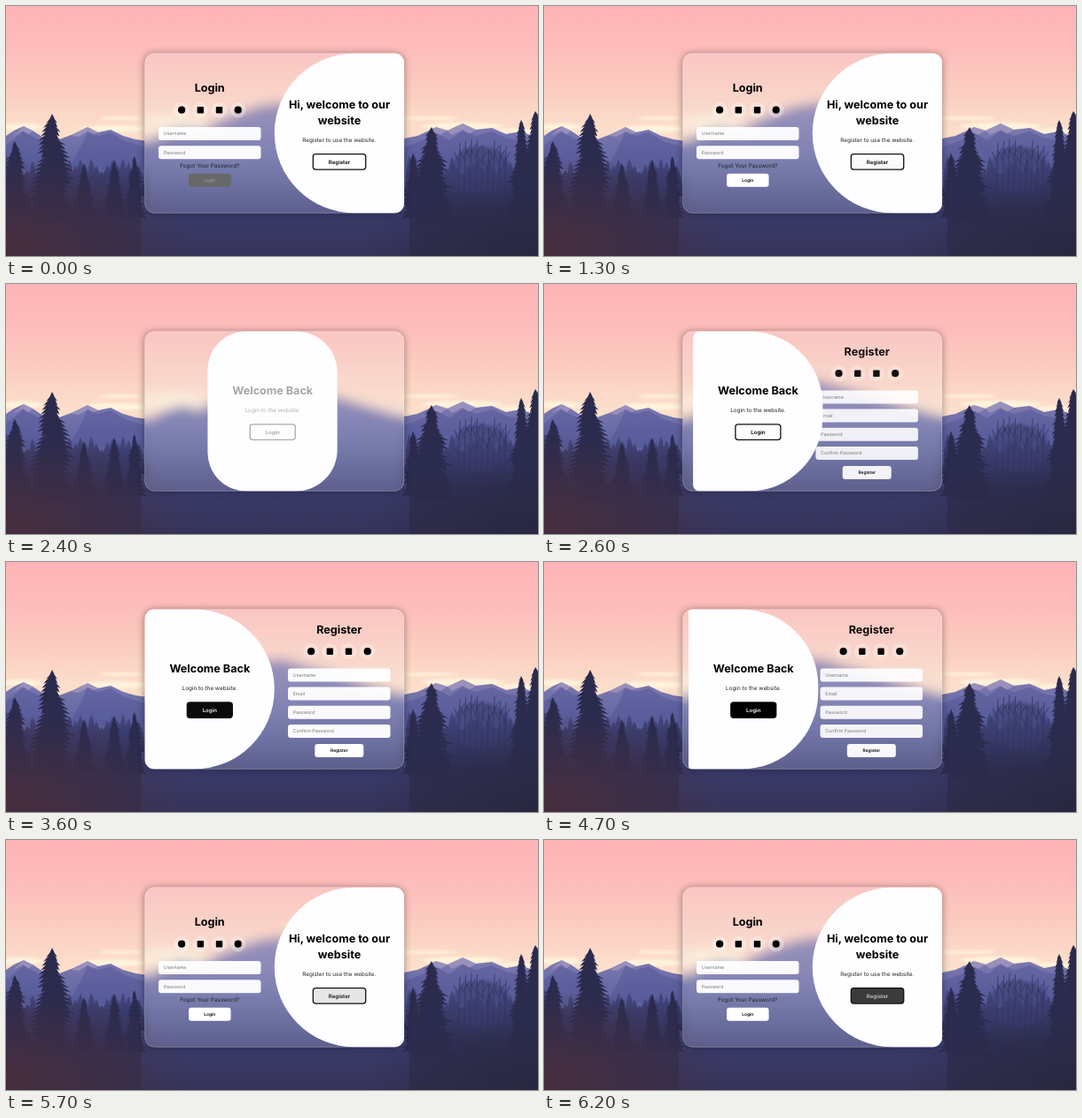
An HTML page for the animation above (6300 ms loop, 600 by 283 pixels).

```html
<!DOCTYPE html>
<html lang="en">
<head>
<meta charset="utf-8">
<style>
html, body { margin: 0; width: 100%; height: 100%; overflow: hidden; }
svg { display: block; width: 600px; height: 283px; font-family: Inter, sans-serif; text-rendering: geometricPrecision; }
text { text-anchor: middle; fill: #000; }
.title { font-size: 12.6px; font-weight: 700; }
.body { font-size: 6.35px; fill: #222; }
.hint { font-size: 5.3px; fill: #777; text-anchor: start; }
.label { font-size: 6.1px; font-weight: 600; }
.small { font-size: 4.9px; }
</style>
</head>
<body>
<svg viewBox="0 0 600 283">
  <defs>
    <linearGradient id="sky" x2="0" y2="1">
      <stop stop-color="#ffb3b7"/><stop offset=".18" stop-color="#fdbdba"/>
      <stop offset=".36" stop-color="#fbcfc1"/><stop offset=".5" stop-color="#fcdfcb"/>
    </linearGradient>
    <linearGradient id="land" gradientUnits="userSpaceOnUse" x1="0" y1="105" x2="0" y2="283">
      <stop stop-color="#8d80ad"/><stop offset=".22" stop-color="#7775ae"/>
      <stop offset=".42" stop-color="#6066a0"/><stop offset=".7" stop-color="#43467e"/>
      <stop offset=".77" stop-color="#383a68"/><stop offset="1" stop-color="#36335a"/>
    </linearGradient>
    <linearGradient id="forest" gradientUnits="userSpaceOnUse" x1="0" y1="160" x2="0" y2="283">
      <stop stop-color="#4b4e88"/><stop offset=".3" stop-color="#393b6b"/>
      <stop offset=".6" stop-color="#303056"/><stop offset="1" stop-color="#322e4e"/>
    </linearGradient>
    <linearGradient id="pine" gradientUnits="userSpaceOnUse" x1="0" y1="120" x2="0" y2="270">
      <stop stop-color="#2a2a4c"/><stop offset=".7" stop-color="#2c2c50"/><stop offset="1" stop-color="#302d4f"/>
    </linearGradient>
    <radialGradient id="ember">
      <stop stop-color="#4a2e3c" stop-opacity=".9"/><stop offset="1" stop-color="#4a2e3c" stop-opacity="0"/>
    </radialGradient>
    <radialGradient id="dusk">
      <stop stop-color="#26263e" stop-opacity=".85"/><stop offset="1" stop-color="#26263e" stop-opacity="0"/>
    </radialGradient>
    <filter id="soft" x="-50%" y="-150%" width="200%" height="400%"><feGaussianBlur stdDeviation="1.5"/></filter>
    <filter id="shade" x="-20%" y="-20%" width="140%" height="140%"><feGaussianBlur stdDeviation="4.5"/></filter>
    <filter id="frost" filterUnits="userSpaceOnUse" x="0" y="0" width="600" height="283"><feGaussianBlur stdDeviation="6.5"/></filter>
    <clipPath id="cardClip"><rect x="156.5" y="53.5" width="292.5" height="181" rx="11"/></clipPath>
    <clipPath id="panelClip"><path class="panel"/></clipPath>
  </defs>

  <g id="scene">
    <rect width="600" height="283" fill="url(#sky)"/>
    <g fill="#fff3dc" filter="url(#soft)">
      <ellipse cx="18" cy="137" rx="24" ry="4"/><ellipse cx="130" cy="127" rx="24" ry="1.8"/>
      <ellipse cx="122" cy="139" rx="36" ry="4"/><ellipse cx="190" cy="132" rx="34" ry="7"/>
      <ellipse cx="478" cy="127" rx="32" ry="1.8"/><ellipse cx="515" cy="136" rx="46" ry="4"/>
      <ellipse cx="580" cy="141" rx="26" ry="3"/>
    </g>
    <path fill="url(#land)" d="M0 147L9 141 20 136 30 141 42 149 60 151 76 145 92 137 104 143 118 140 132 147 146 151 160 153 185 141 200 137 218 143 240 130 262 121 285 113 310 109 340 118 375 128 410 139 449 150 464 147 475 142 485 137 498 141 515 133 530 140 548 138 564 145 580 142 600 149V283H0Z"/>
    <path fill="#c9b6cc" opacity=".4" d="M92 137L104 143 98 146 92 142 82 148 74 147ZM20 136L30 141 25 146 19 141 8 147ZM515 133L530 140 522 145 515 140 503 146 498 141ZM485 137L498 141 490 146 483 143 474 147Z"/>
    <path fill="#4f5092" opacity=".45" d="M92 142L104 147 118 143 134 153 157 160V185H70L84 160ZM20 142L34 150 48 155V185H0V158ZM515 141L530 147 548 142 566 150 600 154V185H449V160L470 152 486 144 500 152Z"/>
    <g id="trees"></g>
    <ellipse cx="0" cy="270" rx="210" ry="100" fill="url(#ember)"/>
    <ellipse cx="600" cy="275" rx="200" ry="85" fill="url(#dusk)"/>
  </g>

  <rect x="156" y="54" width="293" height="182" rx="11" opacity=".4" filter="url(#shade)"/>
  <g clip-path="url(#cardClip)">
    <use href="#scene" filter="url(#frost)"/>
    <rect x="156" y="53" width="294" height="183" fill="#eee" opacity=".17"/>
    <g id="register"></g>
    <g id="login"></g>
    <path class="panel" fill="#fefdff"/>
    <g clip-path="url(#panelClip)">
      <g id="welcome"></g>
      <g id="back"></g>
    </g>
  </g>
  <rect x="156.7" y="53.7" width="292.1" height="180.6" rx="11" fill="none" stroke="#fff" stroke-opacity=".35" stroke-width=".7"/>
</svg>
<script>
const $ = id => document.getElementById(id);
const clamp = v => Math.min(1, Math.max(0, v));
const LOOP = 6300, HALF = 146.25;

// Scenery
let seed = 7;
const random = () => (seed = seed * 16807 % 2147483647) / 2147483647;

function pine(x, top, base, width, fill = 'url(#pine)') {
  const rows = Math.max(5, Math.round((base - top) / 5));
  const side = dir => {
    const points = [];
    for (let i = 1; i <= rows; i++) {
      const y = top + (base - top) * i / rows;
      const reach = width / 2 * Math.pow(i / rows, .65) * (.7 + random() * .6);
      points.push([x + dir * reach, y + 1], [x + dir * reach * .6, y - .5]);
    }
    return points;
  };
  const outline = [[x, top], ...side(1), ...side(-1).reverse()];
  return `<path fill="${fill}" d="M${outline.map(p => p.map(v => v.toFixed(1))).join('L')}Z"/>`;
}

function grove(from, to) {
  let shapes = `<path fill="url(#forest)" d="M${from} 283V190H${to}V283Z"/>`;
  for (let x = from; x <= to; x += 6) shapes += pine(x, 168 + random() * 20, 215, 18, 'url(#forest)');
  return shapes;
}

let trees = grove(0, 152) + grove(455, 600)
  + '<ellipse cx="536" cy="186" rx="34" ry="27" fill="#3a3c70" opacity=".6" filter="url(#soft)"/>';
for (let i = 0; i < 9; i++) {
  const x = 510 + i * 6.5, top = 150 + random() * 14;
  trees += `<path stroke="#32345f" stroke-width=".8" fill="none" d="M${x} 215L${x + 2} ${top}M${x + 1} ${top + 22}l-6-12M${x + 1} ${top + 16}l6-10"/>`;
}
[[10, 153, 240, 42], [52, 122, 245, 62], [88, 178, 240, 28], [122, 174, 240, 28], [145, 170, 240, 26],
 [459, 166, 240, 24], [480, 137, 245, 58], [581, 129, 235, 34], [597, 119, 240, 48]]
  .forEach(tree => trees += pine(...tree));
$('trees').innerHTML = trees;

// Interface parts
const text = (cls, x, y, str) => `<text class="${cls}" x="${x}" y="${y}">${str}</text>`;
const box = (x, y, w, h, extra = '') => `<rect x="${x}" y="${y}" width="${w}" height="${h}" rx="3" ${extra}/>`;
const field = (x, y, hint) => box(x, y, 115.5, 15, 'fill="#fff" fill-opacity=".96"') + text('hint', x + 5.7, y + 9.4, hint);
const icons = (cx, y) => [-31.8, -10.6, 10.6, 31.8].map((dx, i) => {
  const x = cx + dx;
  const mark = i % 3 ? `<rect x="${x - 3.7}" y="${y - 3.7}" width="7.4" height="7.4" rx="1"/>` : `<circle cx="${x}" cy="${y}" r="4.1"/>`;
  return `<circle cx="${x}" cy="${y}" r="8.2" fill="#fff" fill-opacity=".25" stroke="#fff" stroke-opacity=".4" stroke-width=".7"/>` + mark;
}).join('');
const button = (id, cx, y, w, h, cls, label, extra = '') =>
  `<g id="${id}">${box(cx - w / 2, y, w, h, 'fill="#fff" ' + extra)}${text('label ' + cls, cx, y + h / 2 + (cls ? 1.7 : 2.1), label)}</g>`;
const outline = 'stroke="#111" stroke-width="1.3"';

$('login').innerHTML = text('title', 229.7, 97, 'Login') + icons(229.9, 117.7)
  + field(172, 137, 'Username') + field(172, 158.2, 'Password')
  + text('body', 229.8, 183.3, 'Fogot Your Password?')
  + button('submit', 229.8, 189.8, 47.5, 15, 'small', 'Login');

$('register').innerHTML = text('title', 375.8, 80.5, 'Register') + icons(375.9, 101.2)
  + ['Username', 'Email', 'Password', 'Confirm Password'].map((hint, i) => field(318, 120.4 + i * 21.2, hint)).join('')
  + button('signup', 375.8, 205.9, 55, 15, 'small', 'Register');

$('welcome').innerHTML = text('title', 376, 116.3, 'Hi, welcome to our') + text('title', 376, 134.4, 'website')
  + text('body', 375.8, 153.7, 'Register to use the website.')
  + button('toRegister', 376, 167.7, 59.4, 17.4, '', 'Register', outline);

$('back').innerHTML = text('title', 229.8, 125.3, 'Welcome Back')
  + text('body', 229.8, 144.6, 'Login to the website.')
  + button('toLogin', 229.8, 158.9, 51, 17.4, '', 'Login', outline);

// Motion
function bezier(x1, y1, x2, y2) {
  const at = (a, b, s) => 3 * (1 - s) ** 2 * s * a + 3 * (1 - s) * s * s * b + s ** 3;
  return x => {
    if (x <= 0) return 0;
    if (x >= 1) return 1;
    let low = 0, high = 1;
    for (let i = 0; i < 24; i++) {
      const mid = (low + high) / 2;
      if (at(x1, x2, mid) < x) low = mid; else high = mid;
    }
    return at(y1, y2, low);
  };
}
const ease = bezier(.25, .1, .25, 1), easeInOut = bezier(.42, 0, .58, 1);
const OPEN = 2055, CLOSE = 4600, SLIDE = 680;
const hover = (t, start, end) => ease((t - start) / 500) - ease((t - end) / 500);

function tint(id, k) {
  const grey = v => `rgb(${[v, v, v].map(Math.round)})`;
  const [face, label] = $(id).children;
  face.style.fill = grey(255 * (1 - k));
  label.style.fill = grey(255 * k);
}

function panelPath(p) {
  const x = 156.5 + HALF * (1 - p), y = 53.5, h = 181, w = HALF;
  const l = 90.5 * (1 - p), r = 90.5 * p;
  return `M${x + l} ${y}H${x + w - r}a${r} ${r} 0 0 1 ${r} ${r}V${y + h - r}a${r} ${r} 0 0 1 ${-r} ${r}`
    + `H${x + l}a${l} ${l} 0 0 1 ${-l} ${-l}V${y + l}a${l} ${l} 0 0 1 ${l} ${-l}Z`;
}

const panels = document.querySelectorAll('.panel');
const shift = (id, x) => $(id).setAttribute('transform', `translate(${x} 0)`);

function draw(t) {
  const p = easeInOut((t - OPEN) / SLIDE) - easeInOut((t - CLOSE) / SLIDE);
  panels.forEach(el => el.setAttribute('d', panelPath(p)));
  shift('register', -HALF * (1 - p));
  shift('welcome', 160 * p);
  shift('back', HALF * (1 - p));
  $('register').style.opacity = p;
  $('back').style.opacity = clamp((p - .4) * 3);
  $('login').style.display = t >= OPEN && t < CLOSE ? 'none' : '';
  tint('submit', hover(t, -170, 560));
  tint('toRegister', hover(t, 1285, 2200) + hover(t, 5650, 6115));
  tint('toLogin', hover(t, 3230, 4800));
}

const begin = performance.now();
function frame() {
  draw((performance.now() - begin) % LOOP);
  requestAnimationFrame(frame);
}
frame();
</script>
</body>
</html>
```
